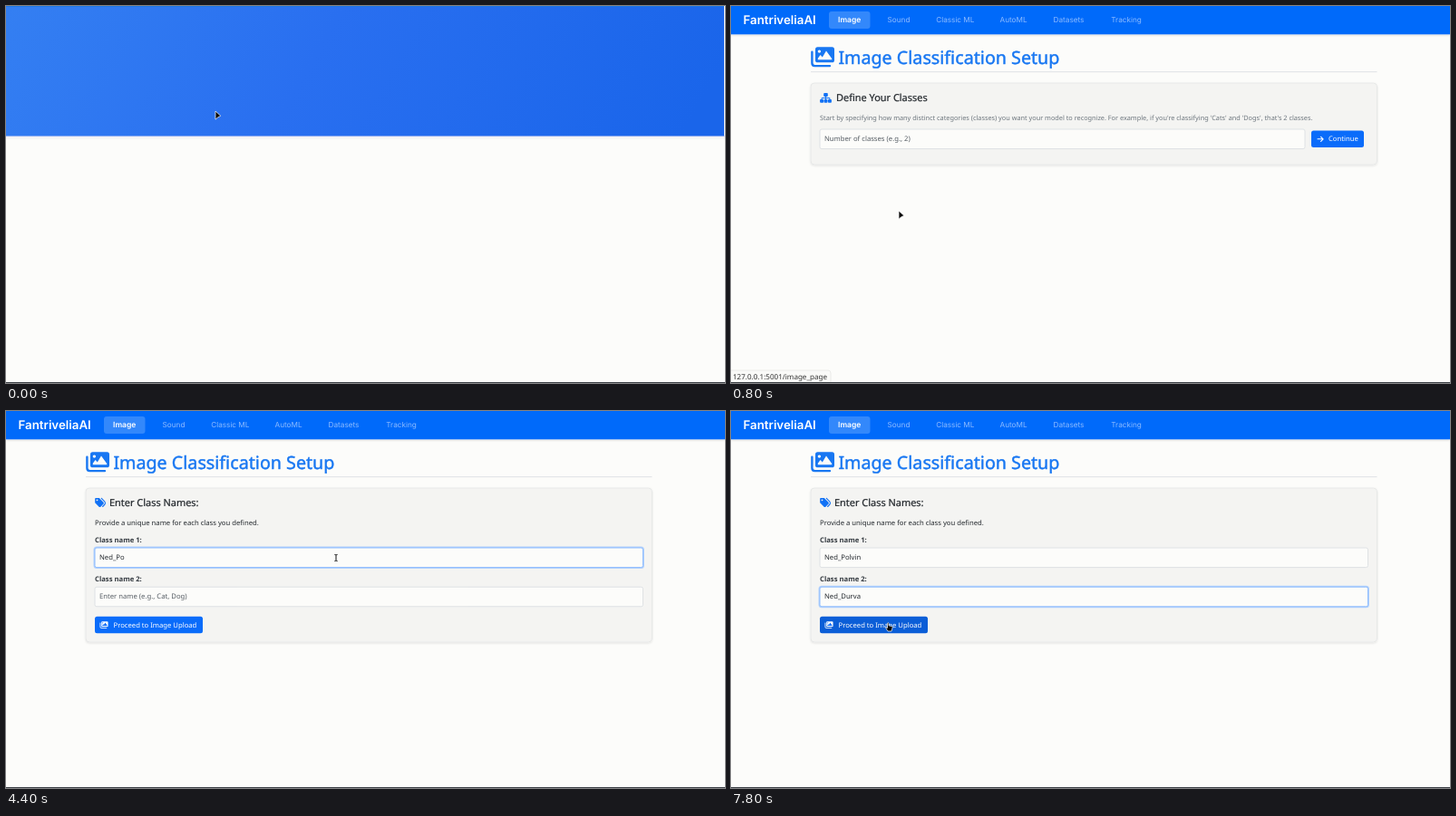
Animation of 793 by 416 pixels, one loop 8000 ms. Source, as an HTML page:

```html
<!DOCTYPE html>
<html lang="en">
<head>
<meta charset="utf-8">
<title>Image Classification Setup</title>
<style>
html, body { margin: 0; width: 100%; height: 100%; overflow: hidden; background: #fcfcfa; }
svg { display: block; width: 793px; height: 416px; }
text { font-family: "Noto Sans", "Open Sans", sans-serif; font-size: 7.68px; white-space: pre; text-rendering: geometricPrecision; }
.nav { font-family: Poppins, Inter, sans-serif; }
.mid { text-anchor: middle; }
.medium { stroke: currentColor; stroke-width: .022em; }
</style>
</head>
<body>
<svg id="stage" viewBox="0 0 793 416" xmlns="http://www.w3.org/2000/svg"></svg>
<script>
const LOOP = 8000, STEP = 200;
const BRAND = "FantriveliaAI", NAME1 = "Ned_Polvin", NAME2 = "Ned_Durva";
const BLUE = "#0a6cfa", PAPER = "#fcfcfa", INK = "#24292e", GRAY = "#6c757d";

const $ = id => document.getElementById(id);
const rect = (x, y, w, h, r, fill, extra = "") =>
  `<rect x="${x}" y="${y}" width="${w}" height="${h}" rx="${r}" fill="${fill}" ${extra}/>`;
const text = (x, y, s, fill, size = 7.68, extra = "") =>
  `<text x="${x}" y="${y}" fill="${fill}" style="font-size:${size}px" ${extra}>${s}</text>`;
const heading = (x, y, s, color, size) =>
  `<g color="${color}">${text(x, y, s, color, size, 'class="medium"')}</g>`;
const group = (id, body, extra = "") => `<g id="${id}" ${extra}>${body}</g>`;
const at = (x, y, body, scale = 1) => `<g transform="translate(${x} ${y}) scale(${scale})">${body}</g>`;
const path = (d, extra = "") => `<path d="${d}" ${extra}/>`;

// Icons are centred on 0,0; `bg` is the colour of their cut-outs.
const line = w => `fill="none" stroke="currentColor" stroke-width="${w}" stroke-linecap="round" stroke-linejoin="round"`;
const icons = {
  image: bg => rect(-8.3, -7.2, 16.6, 14.4, 2, "currentColor") +
    `<circle cx="-4.3" cy="-3.2" r="1.6" fill="${bg}"/>` +
    path("M-6.2 5V3.6L-3.4 .3L-1.7 2L2 -3.1L6.2 3V5Z", `fill="${bg}"`),
  brain: bg => [1, -1].map(s => `<g transform="scale(${s} 1)">` +
    path("M.5 -7C.6 -8.8 3.6 -8.6 4 -6.4C6 -6 6.6 -4 6 -2.6C8.6 -1.5 8.8 1.6 7 2.8C7.5 5 6.1 6.5 4.6 6.5C4 8.8 .6 9 .5 6.8Z", 'fill="currentColor"') +
    path("M3 -4.6Q3.2 -2.8 5 -2.9M2.8 4.2Q3 2.2 5.2 2.4", `fill="none" stroke="${bg}" stroke-width=".7"`) + "</g>").join(""),
  table: bg => rect(-8.2, -7, 16.4, 14, 2, "currentColor") +
    [-6.1, .9].map(x => [-2.6, 2].map(y => rect(x, y, 5.2, 2.8, 0, bg)).join("")).join(""),
  chart: () => path("M-7.4 -6.6V4.2Q-7.4 6.2 -5.4 6.2H7.6", line(2)) +
    path("M-4 2L-1 -2L2 .8L6.6 -4.6", line(2)),
  mic: () => rect(-3, -8.4, 6, 11, 3, "currentColor") +
    path("M-5.2 -1V.2A5.2 5.2 0 0 0 5.2 .2V-1M0 5.4V8M-2.6 8H2.6", line(1.5)),
  robot: bg => rect(-6.4, -4.6, 12.8, 11.8, 2, "currentColor") +
    rect(-.9, -8, 1.8, 4, .9, "currentColor") +
    rect(-9.6, -1.4, 2, 6, 1, "currentColor") + rect(7.6, -1.4, 2, 6, 1, "currentColor") +
    `<circle cx="-3" cy="-.6" r="1.5" fill="${bg}"/><circle cx="3" cy="-.6" r="1.5" fill="${bg}"/>` +
    [-4, -1, 2].map(x => rect(x, 3.6, 2, 1.3, 0, bg)).join(""),
  images: bg => path("M-11.6 -5.6V6.8Q-11.6 9.8 -8.6 9.8H8", line(2.4)) +
    rect(-8, -11, 21, 17, 2.6, "currentColor") +
    `<circle cx="-3.6" cy="-6.2" r="1.7" fill="${bg}"/>` +
    path("M-5.2 3V1.4L-2.4 -2.2L-.2 .2L4 -6.8L10.2 1.6V3Z", `fill="${bg}"`),
  sitemap: () => rect(-2.3, -5.2, 4.6, 3.8, .9, "currentColor") +
    [-6.4, -2, 2.4].map(x => rect(x, 1.6, 4, 3.8, .9, "currentColor")).join("") +
    path("M0 -2V2M-4.4 2V.2H4.4V2", line(1)),
  tags: bg => path("M-5.8 -4.4Q-5.8 -5.2 -5 -5.2H-1.2L3.5 -.5Q4.3 .5 3.5 1.4L.4 4.5Q-.5 5.2 -1.4 4.5L-5.8 .1Z", 'fill="currentColor"') +
    path("M1.3 -4.8L5 -1Q6 .4 5 1.8L2.6 4.3", line(1.1)) +
    `<circle cx="-3.5" cy="-2.9" r=".9" fill="${bg}"/>`,
  arrow: () => path("M-3 0H3M.6 -2.5L3.1 0L.6 2.5", line(1.1)),
};
const icon = (name, x, y, color, bg, scale = 1) =>
  `<g color="${color}">${at(x, y, icons[name](bg), scale)}</g>`;

const cards = [
  ["image", "Image Processing", "Create custom image classification", "models with intuitive tools"],
  ["brain", "Machine Learning", "Build and deploy ML models", "without writing code"],
  ["table", "Table Processing", "Advanced data preprocessing for", "tabular datasets"],
  ["chart", "Tracking", "Monitor experiments and analyze", "your results"],
  ["mic", "Sound Analysis", "Create your own models for sound", "classification"],
  ["robot", "AutoML", "Automatic machine learning", "model selection"],
];
const mid = 'class="mid"';
const cardBody = ([name, title, a, b]) =>
  rect(-100, 0, 200, 130, 9, "#fdfdfb", 'stroke="#f0f1f1" stroke-width="1"') +
  rect(-20.5, 17.5, 41, 41, 8, "#e8f1fc") +
  icon(name, 0, 38, "#2f7de9", "#e8f1fc") +
  text(0, 81, title, INK, 10.5, mid + ' font-weight="600"') +
  text(0, 99, a, GRAY, 7.3, mid) + text(0, 109.7, b, GRAY, 7.3, mid);

const landing =
  rect(0, 143, 793, 1.6, 0, "#e3dff2") + rect(0, 144.6, 793, 2, 0, "#f5f5f6") +
  rect(0, 0, 792, 143.5, 0, "url(#sky)") + rect(0, 0, 792, .8, 0, "#1c79e0") +
  group("hero", text(395.5, 63.4, BRAND + " Platform", "#fff", 21.4, mid + ' font-weight="700"')) +
  group("sub", text(386.5, 87.3, "No-code Machine Learning Solutions", "#fff", 8.5, mid)) +
  cards.map((c, i) => group("card" + i, cardBody(c))).join("");

const links = [["Sound", 185], ["Classic ML", 247.3], ["AutoML", 311.5], ["Datasets", 372.5], ["Tracking", 436]];
const shell =
  rect(0, 0, 793, 31.3, 0, "#066bfa", 'filter="url(#under)"') +
  text(13.5, 20, BRAND, "#fff", 13.3, 'class="nav" font-weight="600"') +
  rect(108, 6, 45.5, 19, 3, "#fff", 'fill-opacity=".2"') +
  text(130.7, 18.2, "Image", "#fff", 8.5, 'class="nav mid" font-weight="600"') +
  links.map(([s, x]) => text(x, 18.2, s, "#8dbbff", 8.2, 'class="nav mid"')).join("") +
  icon("images", 101, 56.3, "#1877f2", PAPER) +
  heading(118.4, 63.8, "Image Classification Setup", "#1877f2", 19.7) +
  rect(88, 72.2, 624.5, 1, 0, "#dfe2e5");

const panel = h => rect(88, 85, 624.5, h, 4, "#f4f4f2", 'stroke="#e4e5e5" stroke-width=".8" filter="url(#soft)"');
const field = (id, x, y, w, hint) =>
  rect(x - .6, y - .6, w + 1.2, 22.8, 2.6, "none", `id="${id}Ring" stroke="#b4d2fc" stroke-width="1.8"`) +
  rect(x, y, w, 21.6, 2, PAPER, `id="${id}Box" stroke="#dcdfe2" stroke-width=".9"`) +
  text(x + 5, y + 13.2, hint, "#555c63", 7.68, `id="${id}Hint"`) +
  text(x + 5, y + 13.2, "", INK, 7.68, `id="${id}Text"`) +
  rect(x + 5, y + 5.5, .8, 10, 0, "#111", `id="${id}Caret"`);
const button = (id, x, y, w, name, dx, label, scale) =>
  rect(x, y, w, 18.4, 2.5, BLUE, `id="${id}"`) +
  icon(name, x + 10, y + 9.2, "#fff", BLUE, scale) + text(x + dx, y + 11.8, label, "#fff");

const setup = panel(90) +
  icon("sitemap", 104.5, 101.3, "#1171f5", PAPER) +
  heading(116, 105.2, "Define Your Classes", INK, 10.95) +
  text(98, 125.6, "Start by specifying how many distinct categories (classes) you want your model to recognize. For example, if you're classifying 'Cats' and 'Dogs', that's 2 classes.", GRAY, 7.31) +
  field("num", 98, 136, 535, "Number of classes (e.g., 2)") +
  button("go", 640, 137.6, 58, "arrow", 19, "Continue", 1);

const hint = "Enter name (e.g., Cat, Dog)";
const options = ["1", "cat", "12", "pouring_water", "vacuum cleaner", "2"];
const names = panel(170) +
  icon("tags", 104, 101.2, "#1171f5", "#f4f4f2") +
  heading(114, 105.2, "Enter Class Names:", INK, 10.95) +
  text(98, 125.6, "Provide a unique name for each class you defined.", INK) +
  [[145.2, 1], [188.4, 2]].map(([y, n]) => text(98, y, `Class name ${n}:`, "#343a40", 7.68, 'font-weight="600"')).join("") +
  field("one", 98, 151, 604.5, hint) + field("two", 98, 194.2, 604.5, hint) +
  button("send", 98, 226.8, 119, "images", 20.5, "Proceed to Image Upload", .35) +
  group("menu", rect(151, 178, 93, 120, 3, "#f6f6f4", 'stroke="#dcdcda" stroke-width=".6" filter="url(#drop)"') +
    options.map((s, i) => text(157, 193 + 19.3 * i, s, INK, 8.7)).join(""));

const outline = 'fill="#0a0a0a" stroke="#fff" stroke-width=".7" stroke-linejoin="round"';
const pointers = {
  arrow: path("M0 0V9.2L2.2 7.2L5.8 5.2Z", outline),
  beam: path("M-1.6 -3.6Q0 -3.6 0 -2.8Q0 -3.6 1.6 -3.6M0 -2.8V2.8M-1.6 3.6Q0 3.6 0 2.8Q0 3.6 1.6 3.6", 'fill="none" stroke="#111" stroke-width="1"'),
  hand: path("M-1.5 3V-.8Q-.8 -2 0 -.8V1.8L3.5 2.6Q4.3 3 4 4.4L3 8H-1L-3.2 4.6Q-3.2 3.4 -1.5 4.4Z", outline),
};

$("stage").innerHTML = `<defs>
  <linearGradient id="sky" gradientUnits="userSpaceOnUse" x1="0" y1="0" x2="620" y2="360">
    <stop offset="0" stop-color="#347ff2"/><stop offset=".45" stop-color="#296ff0"/><stop offset="1" stop-color="#1a65ea"/>
  </linearGradient>
  <filter id="under" x="-2%" y="-20%" width="104%" height="160%"><feDropShadow dx="0" dy="1" stdDeviation="1" flood-opacity=".14"/></filter>
  <filter id="soft" x="-5%" y="-20%" width="110%" height="150%"><feDropShadow dx="0" dy="1" stdDeviation="1.2" flood-opacity=".1"/></filter>
  <filter id="drop" x="-10%" y="-10%" width="120%" height="125%"><feDropShadow dx="0" dy="1.5" stdDeviation="1.6" flood-opacity=".25"/></filter>
</defs>` + rect(0, 0, 793, 416, 0, PAPER) +
  group("landing", landing) + group("shell", shell) + group("setup", setup) + group("names", names) +
  group("status", rect(-3, 402, 113, 16, 3, "#fafaf8", 'stroke="#e6e6e4" stroke-width=".8"') +
    text(2, 412, "127.0.0.1:5001/image_page", "#333", 8.07)) +
  rect(0, 415, 793, 1, 0, "#3c4045") +
  group("pointer", Object.entries(pointers).map(([k, d]) => group(k, d)).join(""));

const clamp = v => Math.max(0, Math.min(1, v));
const show = (id, on) => $(id).setAttribute("display", on ? "inline" : "none");
const put = (id, x, y) => $(id).setAttribute("transform", `translate(${x} ${y})`);
const fade = (id, v) => $(id).setAttribute("opacity", v);

const keys1 = [3000, 3200, 3400, 3600, 4000, 4400, 4600, 4800, 5000, 5200];
const keys2 = Array.from(NAME2, (_, i) => 5600 + STEP * i);
const typed = (s, keys, t) => s.slice(0, keys.filter(k => k <= t).length);

const route = [[0, 231, 116], [400, 221, 133], [600, 185, 226], [800, 185, 226], [1200, 262, 147],
  [1400, 262, 147], [1800, 668, 147], [2000, 668, 147], [2400, 364, 162], [7200, 364, 162],
  [7600, 174, 235], [8000, 174, 235]];
function spot(t) {
  const i = route.findIndex(p => p[0] > t);
  const [t0, x0, y0] = route[i - 1], [t1, x1, y1] = route[i];
  const k = (t - t0) / (t1 - t0);
  return [x0 + (x1 - x0) * k, y0 + (y1 - y0) * k];
}

function fill(id, value, focus, blink) {
  const label = $(id + "Text");
  label.textContent = value;
  show(id + "Hint", !value);
  show(id + "Ring", focus);
  $(id + "Box").setAttribute("stroke", focus ? "#86b7fe" : "#dcdfe2");
  show(id + "Caret", focus && blink);
  if (focus && blink) {
    const w = value ? label.getComputedTextLength() : 0;
    $(id + "Caret").setAttribute("x", +label.getAttribute("x") + w);
  }
}

function draw(t) {
  const blink = Math.floor(t / 400) % 2 === 0;
  show("landing", t < 800);
  show("shell", t >= 800);
  show("setup", t >= 800 && t < 2000);
  show("names", t >= 2000);
  show("status", t >= 600 && t < 1000);

  const rise = clamp((t - 40) / 300);
  fade("hero", rise);
  put("hero", 0, -6 * (1 - rise) ** 2);
  fade("sub", .9 * clamp((t - 350) / 200));
  cards.forEach((_, i) => {
    const p = 1 - (1 - clamp((t - 40) / 230 - .26 * i)) ** 2;
    fade("card" + i, p);
    put("card" + i, 184 + 212.2 * (i % 3), 170 + 143.3 * Math.floor(i / 3) + 8 * (1 - p));
  });

  fill("num", t >= 1400 ? "2" : "", t >= 1200 && t < 1800, blink);
  fill("one", typed(NAME1, keys1, t), t >= 2400 && t < 5400, blink);
  fill("two", typed(NAME2, keys2, t), t >= 5400, blink);
  show("menu", t >= 2600 && t < 3000);
  $("go").setAttribute("fill", t >= 1800 ? "#0b5ed7" : BLUE);
  $("send").setAttribute("fill", t >= 7600 ? "#0b5ed7" : BLUE);

  const hand = t === 600 || t === 1800 || t >= 7600;
  const beam = !hand && (t >= 1200 && t < 1800 || t >= 2200);
  show("hand", hand);
  show("beam", beam);
  show("arrow", !hand && !beam);
  put("pointer", ...spot(t));
}

const start = performance.now();
function tick() {
  const t = (performance.now() - start) % LOOP;
  draw(Math.floor(t / STEP) * STEP);
  requestAnimationFrame(tick);
}
tick();
</script>
</body>
</html>
```
